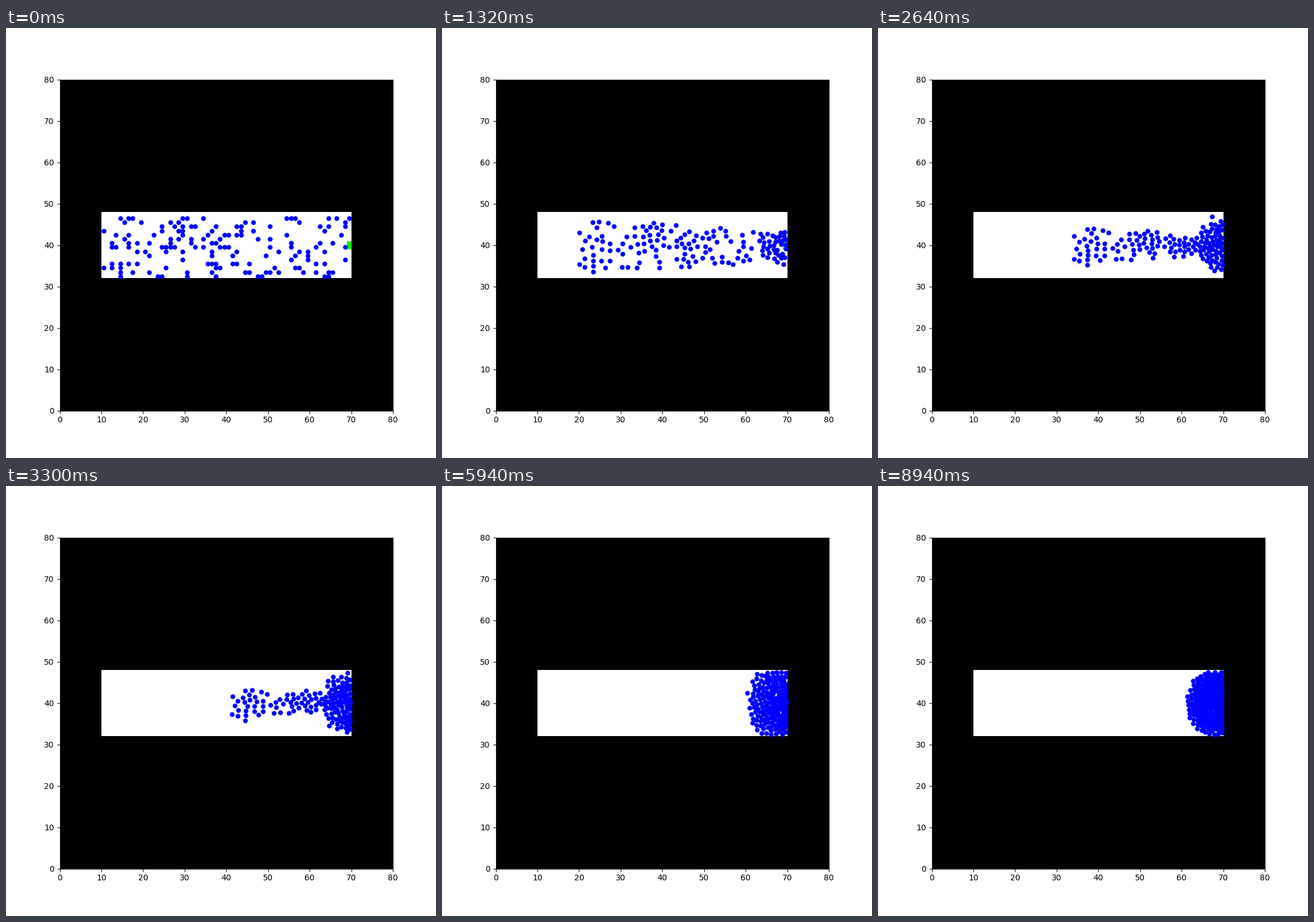
Animation of 748x748 px, one loop 9000 ms. Source, as a matplotlib script:

```python
import numpy as np
import matplotlib.pyplot as plt
from matplotlib.animation import FuncAnimation
from matplotlib.colors import ListedColormap

FRAMES, INTERVAL, SUBSTEPS = 150, 60, 4
LEFT, RIGHT, BOTTOM, TOP = 10, 70, 32, 48
GOAL = np.array([69.7, 40.0])
PEOPLE = 150

SPEED = 0.67    # desired speed, cells per frame
TAU = 10.0      # relaxation time, frames
PUSH = 0.07     # repulsion at contact
REACH = 0.08    # decay length of the repulsion
RADIUS = 0.5

# occupied columns of the rear crowd, from the top row down
REAR = [
    [14, 16, 17, 29, 30, 34],
    [15, 19, 26, 28],
    [24, 27, 29, 31, 32, 37, 42, 43],
    [10, 24, 28, 29, 36, 43],
    [13, 16, 22, 29, 35, 39, 40, 42, 43],
    [15, 26, 28, 31, 34, 38],
    [12, 16, 18, 21, 26, 31, 36, 37],
    [12, 13, 16, 24, 25, 26, 27, 32, 34, 38, 39, 40],
    [18, 20, 25, 29, 36, 42],
    [21, 36, 41],
    [29],
    [12, 14, 16, 18, 35, 36, 37, 41, 42],
    [10, 12, 14, 25, 37, 38],
    [14, 17, 21, 30, 36],
    [14, 23, 24, 30, 37],
]
FRONT = 44      # from this column on, people stand at random


def starting_cells():
    cells = [(col, TOP - 2 - k) for k, row in enumerate(REAR) for col in row]
    free = [(col, row) for col in range(FRONT, RIGHT)
            for row in range(BOTTOM, TOP - 1)
            if not (col == RIGHT - 1 and row in (39, 40))]
    rng = np.random.default_rng(7)
    picks = rng.choice(len(free), PEOPLE - len(cells), replace=False)
    return np.array(cells + [free[p] for p in picks]) + 0.5


def repel(gap):
    return PUSH * np.exp(np.minimum(-gap / REACH, 4))


def acceleration(pos, vel):
    to_goal = GOAL - pos
    dist = np.linalg.norm(to_goal, axis=1, keepdims=True)
    acc = (SPEED * to_goal / np.maximum(dist, 0.3) - vel) / TAU

    diff = pos[:, None] - pos[None]
    d = np.hypot(diff[..., 0], diff[..., 1])
    np.fill_diagonal(d, np.inf)
    acc += (diff * (repel(d - 2 * RADIUS) / d)[..., None]).sum(axis=1)

    low, high = np.array([LEFT, BOTTOM]), np.array([RIGHT, TOP])
    acc += repel(pos - low - RADIUS) - repel(high - pos - RADIUS)
    return acc


def simulate():
    pos = starting_cells()
    vel = np.zeros_like(pos)
    dt = 1 / SUBSTEPS
    path = [pos.copy()]
    for _ in range(FRAMES - 1):
        for _ in range(SUBSTEPS):
            vel += acceleration(pos, vel) * dt
            pos += vel * dt
        path.append(pos.copy())
    return path


path = simulate()

room = np.zeros((80, 80))
room[BOTTOM:TOP, LEFT:RIGHT] = 1
room[39:41, 69] = 2

fig, ax = plt.subplots(figsize=(7.48, 7.48), dpi=100)
ax.pcolormesh(np.arange(81), np.arange(81), room,
              cmap=ListedColormap(["black", "white", "lime"]))
ax.set_xlim(0, 80)
ax.set_ylim(0, 80)
crowd, = ax.plot([], [], "bo", markersize=5)


def draw(i):
    crowd.set_data(path[i][:, 0], path[i][:, 1])
    return crowd,


anim = FuncAnimation(fig, draw, frames=FRAMES, interval=INTERVAL,
                     repeat=True, repeat_delay=0)
plt.show()
```
